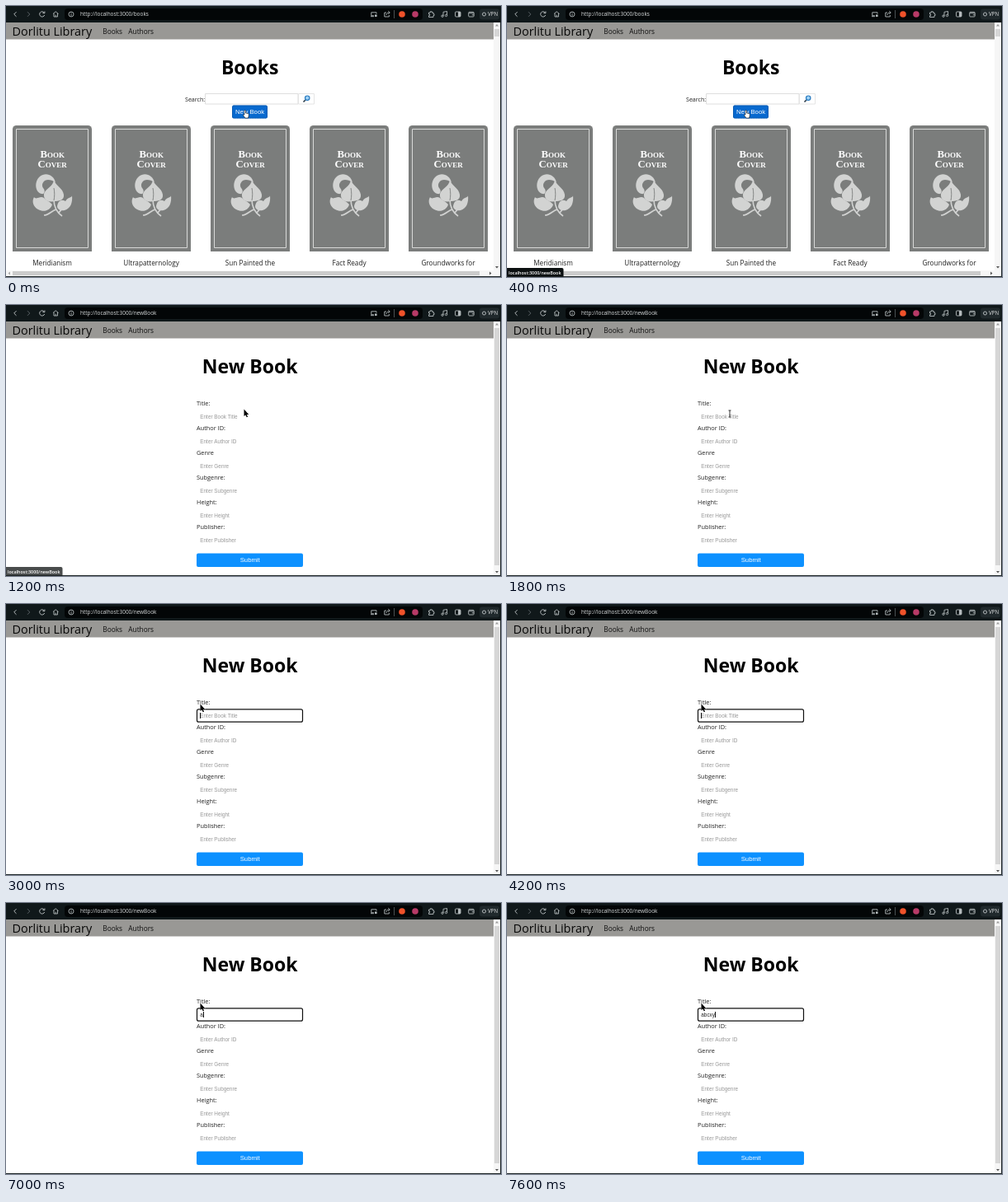
Write an HTML page with a canvas that moves like this. It is 600 by 329 pixels and loops after 8000 ms.

```html
<!DOCTYPE html>
<html lang="en">
<head>
<meta charset="utf-8">
<title>Library</title>
<style>
html, body { margin: 0; width: 100%; height: 100%; overflow: hidden; background: #fff; }
canvas { display: block; width: 600px; height: 329px; }
</style>
</head>
<body>
<canvas id="stage" width="600" height="329"></canvas>
<script>
const ctx = document.getElementById('stage').getContext('2d');
const LOOP = 8000;
const SANS = '"Open Sans", "Noto Sans", sans-serif';
const ARIAL = '"Liberation Sans", Arial, sans-serif';
const SERIF = '"Liberation Serif", "Noto Serif", serif';
const TITLES = ['Meridianism', 'Ultrapatternology', 'Sun Painted the', 'Fact Ready', 'Groundworks for'];
const FIELDS = [
  ['Title:', 'Enter Book Title'], ['Author ID:', 'Enter Author ID'], ['Genre', 'Enter Genre'],
  ['Subgenre:', 'Enter Subgenre'], ['Height:', 'Enter Height'], ['Publisher:', 'Enter Publisher']
];

// Each list holds [start time, value...]; the latest started entry applies.
const CURSOR = [
  [0, 'hand', 287.5, 126], [1000, 'arrow', 288.5, 126.5], [1400, 'beam', 286, 132],
  [1600, 'beam', 280, 132], [1800, 'beam', 270, 132], [2000, 'beam', 267, 132],
  [2400, 'arrow', 236, 122], [2600, 'arrow', 235.5, 121.5]
];
const CARET = [[0, 0], [2000, 1], [2600, 0], [3000, 1], [3600, 0], [4200, 1], [5800, 0], [6400, 1]];
const TYPED = [[0, ''], [7000, 'a'], [7200, 'abc'], [7600, 'abcxy']];
const STATUS = [[0, 0], [200, 0.6], [400, 1], [1200, 0.75], [1400, 0]];
const at = (list, t) => list.filter(k => k[0] <= t).pop().slice(1);

function rect(x, y, w, h, color) {
  ctx.fillStyle = color;
  ctx.fillRect(x, y, w, h);
}

function round(x, y, w, h, r, fill, stroke, width = 1) {
  ctx.beginPath();
  ctx.roundRect(x, y, w, h, r);
  if (fill) { ctx.fillStyle = fill; ctx.fill(); }
  if (stroke) { ctx.strokeStyle = stroke; ctx.lineWidth = width; ctx.stroke(); }
}

function dot(x, y, r, fill, stroke, width = 1) {
  round(x - r, y - r, 2 * r, 2 * r, r, fill, stroke, width);
}

function text(str, x, y, size, color, family = SANS, style = '', align = 'left') {
  ctx.font = `${style} ${size}px ${family}`;
  ctx.textAlign = align;
  ctx.fillStyle = color;
  ctx.fillText(str, x, y);
}

function line(d, color, width = 1) {
  ctx.strokeStyle = color;
  ctx.lineWidth = width;
  ctx.stroke(new Path2D(d));
}

function shape(d, color) {
  ctx.fillStyle = color;
  ctx.fill(new Path2D(d));
}

function drawToolbar(url, loading) {
  const icon = '#b4babc';
  rect(0, 0, 600, 20, '#10181a');
  round(71, 3, 434, 14, 4, '#030607');
  line('M12.5 7.2L9.7 10L12.5 12.8', icon);
  line('M26 7.2L28.8 10L26 12.8', '#596064');
  if (loading) line('M41 7L47 13M47 7L41 13', icon, 0.9);
  else line('M46.2 8A3.1 3.1 0 1 0 46.7 11M46.9 6.5V8.7H44.5', icon);
  line('M57 9.5L60.2 6.8L63.5 9.5M58 9V13H62.5V9M60.2 13V10.8', icon, 0.9);
  dot(79, 10, 3, null, icon, 0.9);
  line('M79 9.4V11.8M79 8V8.6', icon, 0.9);
  text(url, 90, 12.4, 6.45, '#dde0e1');

  line('M449 9.5V7.8H442.8V11.8H446M442 12.7H446', icon, 0.9);
  rect(447, 10.5, 2.6, 2.5, icon);
  line('M461 8H458.8V13H464.3V11M461 11C461 8.8 462.5 8 465 8M463.3 6.2L465.3 8L463.3 9.8', icon, 0.9);
  rect(470, 5, 1, 10, '#4a5052');
  dot(480, 10, 3.8, '#f0522a');
  dot(496, 10, 3.8, '#b83a67');
  line('M512.5 8H514.3V6.8H516.3V8H518V9.8H519V11.5H518V13.5H512.5V11.7H513.6V10H512.5Z', icon, 0.9);
  line('M530 12V7.3L534.5 6.5V11.3', icon, 0.9);
  dot(529, 12.2, 1.2, null, icon, 0.9);
  dot(533.5, 11.5, 1.2, null, icon, 0.9);
  round(544.5, 7, 6.5, 6, 1, null, icon, 0.9);
  rect(548, 7, 3, 6, icon);
  round(560.7, 7.3, 6.5, 5.7, 1, null, icon, 0.9);
  line('M561 8.7H567M564.8 10.8H567', icon, 0.9);
  round(574, 3.5, 24, 13, 3, '#20292c');
  dot(579.5, 10, 2, null, icon, 1);
  text('VPN', 584, 12.3, 6.2, '#e6e8e9');
}

function drawNav() {
  rect(0, 20, 591, 20.5, '#999895');
  text('Dorlitu Library', 7.5, 36, 14.4, '#080808');
  text('Books', 117.3, 34, 8.3, '#111');
  text('Authors', 148.3, 34, 8.3, '#111');
}

function drawScrollbar(bottom, thumbHeight) {
  rect(591, 20, 8, bottom - 20, '#f6f6f6');
  rect(592, 28, 6, thumbHeight, '#d6d6d6');
  shape('M593 24.5L595 22L597 24.5Z', '#999');
  shape(`M593 ${bottom - 5}L595 ${bottom - 2.5}L597 ${bottom - 5}Z`, '#555');
}

function drawCover(x) {
  const pale = '#d2d3d2', gray = '#7b7d7c';
  ctx.save();
  ctx.translate(x, 145);
  round(0, 0, 96, 153, [4.5, 4.5, 0, 0], gray);
  round(4.5, 4.5, 87, 144, 0, null, '#d8d9d8');
  text('Book', 48.2, 39.3, 12.7, '#fff', SERIF, 'small-caps bold', 'center');
  text('Cover', 48.2, 50.5, 12.7, '#fff', SERIF, 'small-caps bold', 'center');
  // scroll, central leaf, left leaf, right leaf
  shape('M52 69C50 60 40 56 33 62C26 68 27 81 35 83C39 84 40 79 37 76C34 71 38 66 43 66C46 66 49 67 52 69Z', pale);
  shape('M50 66C52 73 61 76 62 84C63 91 56 92 50 92C43 94 37 90 38 83C40 76 49 75 50 66Z', pale);
  shape('M48 96C46 103 38 106 31 102C25 99 23 92 26 87C29 91 33 85 38 88C42 92 45 92 48 96Z', pale);
  shape('M54 98C55 91 60 89 64 92C68 86 72 88 72 85C73 94 70 101 63 103C58 104 54 102 54 98Z', pale);
  line('M50 90C50 97 53 105 60 110M53 102C48 103 44 109 38 109M56 106L60 101', pale, 1.7);
  line('M50 76C51 81 51 86 50 91', gray, 0.9);
  ctx.restore();
}

function drawBooks() {
  text('Books', 295.7, 83, 23, '#000', SANS, 'bold', 'center');
  text('Search:', 217, 115.8, 7.1, '#222');
  round(241.5, 106.5, 112.5, 12.5, 0, '#fff', '#dedede');
  round(354.5, 106.5, 19, 12.5, 0, '#fff', '#e4e4e4');
  line('M363 114L360.5 116.5', '#344452', 1.7);
  dot(365.2, 111.7, 2.7, '#9fd2f6', '#2879be', 1.2);
  round(274, 120.5, 43, 16, 2, '#0869cf');
  ctx.setLineDash([1, 1]);
  round(274.5, 121, 42, 15, 2, null, '#114a88', 0.8);
  ctx.setLineDash([]);
  text('New Book', 295.5, 131, 7.7, '#fff', ARIAL, '', 'center');
  TITLES.forEach((title, i) => {
    drawCover(8 + 120 * i);
    text(title, 56 + 120 * i, 315, 8.2, '#222', SANS, '', 'center');
  });
  drawScrollbar(321, 9);
  rect(0, 321, 599, 7, '#f6f6f6');
  rect(8, 322, 566, 5, '#cbcbcb');
  shape('M5 322.5L2.5 324.5L5 326.5Z', '#aaa');
  shape('M586 322.5L588.5 324.5L586 326.5Z', '#555');
}

function drawForm(t) {
  const [typed] = at(TYPED, t);
  text('New Book', 295.7, 83, 23, '#000', SANS, 'bold', 'center');
  FIELDS.forEach(([label, hint], i) => {
    const y = 121.7 + 30 * i;
    text(label, 231, y, 7.35, '#222');
    const filled = i === 0 && typed;
    text(filled ? typed : hint, 235.3, y + 16, 6.4, filled ? '#222' : '#989898', ARIAL);
  });
  if (t >= 2000) round(231.5, 127.8, 128, 15.4, 2, null, '#111', 1.2);
  if (at(CARET, t)[0]) {
    ctx.font = `6.4px ${ARIAL}`;
    rect(Math.round(235.2 + ctx.measureText(typed).width), 132, 1, 7, '#111');
  }
  round(231, 301.5, 129, 16.5, 2, '#0d91ff');
  text('Submit', 295.7, 312.3, 7.7, '#fff', ARIAL, '', 'center');
  drawScrollbar(328, 288);
}

function drawStatus(opacity) {
  if (!opacity) return;
  ctx.globalAlpha = opacity;
  round(0, 318, 68.5, 10.5, [0, 2, 0, 0], '#0c1011');
  ctx.globalAlpha = 1;
  text('localhost:3000/newBook', 2, 325.7, 5.4, '#fff', SANS, '600');
}

function drawCursor([kind, x, y]) {
  ctx.save();
  ctx.translate(x, y);
  if (kind === 'arrow') {
    const arrow = 'M0 0V8.6L1.9 6.9L3.2 9.8L4.6 9.2L3.3 6.4H5.8Z';
    line(arrow, '#fff', 0.5);
    shape(arrow, '#000');
  } else if (kind === 'beam') {
    line('M-1.5 -4H1.5M0 -4V4M-1.5 4H1.5', '#222', 0.9);
  } else {
    const hand = 'M1.5 6V1Q2.3 -0.2 3.1 1V4L6 4.6Q7 5 6.8 7L6 10H2.5L0 6.8Q0 5.5 1.5 6Z';
    shape(hand, '#fff');
    line(hand, '#111', 0.6);
  }
  ctx.restore();
}

function draw(t) {
  rect(0, 0, 600, 329, '#fff');
  drawToolbar('http://localhost:3000/' + (t < 1000 ? 'books' : 'newBook'), t >= 600 && t < 1200);
  drawNav();
  if (t < 1200) drawBooks();
  else drawForm(t);
  rect(599, 20, 1, 309, '#20282a');
  rect(0, 328, 600, 1, '#20282a');
  drawStatus(at(STATUS, t)[0]);
  drawCursor(at(CURSOR, t));
}

const start = performance.now();
function tick() {
  draw((performance.now() - start) % LOOP);
  requestAnimationFrame(tick);
}
tick();
</script>
</body>
</html>
```
